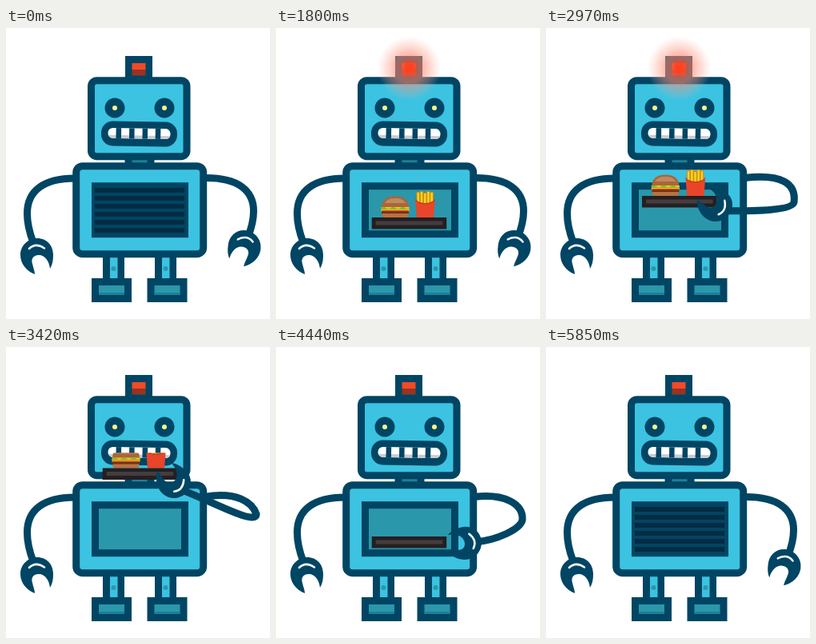
An HTML page for the animation above (7.2 s loop, 330x364 px).

```html
<!DOCTYPE html>
<html lang="en">
<head>
<meta charset="utf-8">
<title>Robot lunch</title>
<style>
  html, body { margin: 0; width: 100%; height: 100%; overflow: hidden; background: #fff; }
  svg { display: block; width: 330px; height: 364px; }
  .dark { fill: #004563; }
  .blue { fill: #3bc3e1; }
  .teal { fill: #2b97ab; }
  .shade { fill: #1f7f95; }
  .edge { stroke: #004563; stroke-width: 9; }
  .arm { fill: none; stroke: #004563; stroke-width: 9; stroke-linejoin: round; }
</style>
</head>
<body>
<svg viewBox="0 0 330 364">
  <defs>
    <radialGradient id="halo">
      <stop offset="0" stop-color="#fb4a28" stop-opacity=".9"/>
      <stop offset=".2" stop-color="#f8644a" stop-opacity=".72"/>
      <stop offset=".45" stop-color="#ff8a74" stop-opacity=".58"/>
      <stop offset=".72" stop-color="#ff9c88" stop-opacity=".32"/>
      <stop offset="1" stop-color="#ffb0a0" stop-opacity="0"/>
    </radialGradient>
    <filter id="soft" x="-50%" y="-50%" width="200%" height="200%"><feGaussianBlur stdDeviation="2"/></filter>
    <clipPath id="belowTeeth"><path d="M0 132.500H330V364H0Z"/></clipPath>
    <clipPath id="hatch"><path d="M111 200H223V256H111Z"/></clipPath>
    <clipPath id="mouthShape"><rect x="127.500" y="125.500" width="78" height="13" rx="6"/></clipPath>
    <g id="hand">
      <path class="dark" d="M3 24C14 20 21 10 21 0C21-13 10-21 0-21C-12-21-20-12-20 0C-20 7-19 12-16 17C-15 8-10 0-2 0C5 0 8 5 6 11C5 16 3 20 3 24Z"/>
      <path d="M10-8Q2-16-9-8.500" fill="none" stroke="#fff" stroke-width="2.500" stroke-linecap="round"/>
    </g>
    <g id="leg">
      <path class="dark" d="M121 284H148V318H121Z"/>
      <path class="blue" d="M130 287H139.500V313H130Z"/>
      <circle class="teal" cx="134.500" cy="301" r="3"/>
    </g>
    <g id="foot">
      <path class="dark" d="M107 313H157V343H107Z"/>
      <path class="teal" d="M116 322H148V334H116Z"/>
      <path class="shade" d="M116 331H148V334H116Z"/>
    </g>
    <g id="eye">
      <circle class="dark" r="12.500"/>
      <circle r="3" fill="#f8f58c"/>
    </g>
  </defs>

  <!-- legs and neck -->
  <use href="#leg"/><use href="#leg" x="65"/>
  <use href="#foot"/><use href="#foot" x="69.500"/>
  <path class="dark" d="M148.500 160H185.500V175H148.500Z"/>
  <path class="shade" d="M157.500 164H176.500V170H157.500Z"/>

  <!-- head -->
  <path class="dark" d="M149 35H183V64H149Z"/>
  <path fill="#f24a27" d="M157.500 44H174.500V52H157.500Z"/>
  <path fill="#983423" d="M157.500 52H174.500V59.500H157.500Z"/>
  <rect class="blue edge" x="106.500" y="65.700" width="119.500" height="95" rx="7"/>
  <use href="#eye" x="136" y="100"/><use href="#eye" x="198" y="100"/>
  <g transform="rotate(1 166.500 132.500)">
    <rect class="dark" x="119" y="117" width="95" height="31" rx="14.500"/>
    <g clip-path="url(#mouthShape)">
      <path fill="#fff" d="M127 125H206V139H127Z"/>
      <path fill="#c9cbd3" d="M127 134.500H206V139H127Z"/>
      <path class="edge" style="stroke-width:6.5" d="M140.800 125V140M157.300 125V140M173.800 125V140M190 125V140"/>
    </g>
  </g>
  <g id="lamp">
    <circle cx="166.500" cy="50.500" r="40" fill="url(#halo)"/>
    <path fill="#ff3f1c" filter="url(#soft)" d="M160 43H173.500V56.500H160Z"/>
  </g>

  <!-- body and window -->
  <rect class="blue edge" x="87.700" y="172.700" width="159" height="110" rx="8"/>
  <rect class="teal edge" x="111.500" y="197.700" width="112" height="60"/>

  <g clip-path="url(#belowTeeth)">
    <g id="food">
      <path fill="#a9663a" d="M132 224.500C132 215 138.500 210.500 149 210.500S166 215 166 224.500Z"/>
      <path fill="#c08a60" d="M136 219C139 214 143 213 149 213S159 214 162 219Z"/>
      <path fill="#f5c51e" d="M131.500 224H166.500V229H131.500Z"/>
      <path fill="#8ab62c" d="M131.500 225Q134.500 222.500 137.500 225T143.500 225T149.500 225T155.500 225T161.500 225T166.500 225V227H131.500Z"/>
      <path fill="#d8422a" d="M132.500 228H165.500V230H132.500Z"/>
      <path fill="#6d321c" d="M132 229.500H166V232.500H132Z"/>
      <path fill="#b87240" d="M132.500 232H165.500V234Q165.500 237 161.500 237H136.500Q132.500 237 132.500 234Z"/>
      <g id="sticks" fill="#fdd01c" stroke="#c98a14"></g>
      <path fill="#e8452a" d="M174 213.500C178 221 195 221 199 213.500L197 237H176Z"/>
      <path fill="none" stroke="#b8321e" d="M174.500 214.500C178 221.500 195 221.500 198.500 214.500"/>
    </g>
  </g>
  <g id="tray">
    <path fill="#241f21" d="M119.700 237H213.200V251.500H119.700Z"/>
    <path fill="#453c3f" d="M124.700 241.500H208.200V246.500H124.700Z"/>
  </g>
  <g clip-path="url(#hatch)">
    <g id="shutter"><path class="dark" d="M111 200H223V256H111Z"/></g>
  </g>

  <!-- arms -->
  <path class="arm" d="M86 188C48 188 26.500 203 26.500 232C26.500 245 29 255 34 268"/>
  <use href="#hand" transform="translate(39 284) scale(-1 1)"/>
  <path class="arm" id="arm"/>
  <use href="#hand" id="grip"/>
</svg>
<script>
const LOOP = 7200, STEP = 30;
const el = id => document.getElementById(id);
const clamp = v => Math.max(0, Math.min(1, v));
const span = (t, a, b) => clamp((t - a) / (b - a));

const linear = u => u;
const easeIn = u => u * u;
const easeOut = u => 1 - (1 - u) ** 2;
const smooth = u => u * u * (3 - 2 * u);

// Upper-arm controls, elbow, forearm controls, hand x, y, turn, tray lift
const rest  = [290, 187, 309.5, 203, 309.5, 229, 309.5, 240, 307, 250, 297.5, 274, 8, 0];
const reach = [285, 184, 309, 196, 308, 218, 307, 230, 285, 243, 252, 257, 72, 0];
const leave = [285, 183, 309, 196, 308, 216, 306, 228, 275, 242, 236, 245, 72, 0];
const hold  = [285, 183, 309, 196, 309, 218, 305, 230, 262, 240, 213, 247, 90, 0];
const lift  = [295, 182, 313, 195, 310, 218, 307, 228, 265, 229, 212, 221, 112, 27];
const serve = [289, 180, 308, 195, 313, 209, 312, 224, 260, 194, 210, 168, 128, 85.5];

// Each key: time, pose, easing on the way to it
const keys = [
  [0, rest, linear], [1800, rest, linear], [2250, reach, linear], [2700, hold, linear],
  [2970, lift, easeIn], [3420, serve, easeOut], [4020, serve, linear], [4350, hold, smooth],
  [4440, leave, linear], [4770, reach, linear], [5460, rest, linear], [LOOP, rest, linear]
];

function poseAt(t) {
  const i = keys.findIndex(k => k[0] > t);
  const [start, from] = keys[i - 1], [end, to, ease] = keys[i];
  const u = ease(span(t, start, end));
  return from.map((v, n) => v + (to[n] - v) * u);
}

function drawArm(p) {
  const [x, y, turn] = p.slice(10);
  const a = turn * Math.PI / 180, c = Math.cos(a), s = Math.sin(a);
  const wrist = [x + 3 * c + 13 * s, y + 3 * s - 13 * c];
  el("arm").setAttribute("d", `M248 187.5C${p.slice(0, 6)}C${p.slice(6, 10)},${wrist}`);
  el("grip").setAttribute("transform", `translate(${x} ${y}) rotate(${turn})`);
}

function draw(now) {
  const t = Math.floor(now % LOOP / STEP) * STEP;
  const pose = poseAt(t), up = pose[13];
  drawArm(pose);
  el("tray").setAttribute("transform", `translate(${up / 85} ${-up})`);

  const eaten = 22 * span(t, 3420, 3690);
  el("food").setAttribute("transform", `translate(${up / 85} ${-up - eaten})`);
  el("food").style.display = t < 3690 ? "" : "none";

  el("lamp").style.opacity = span(t, 420, 480) - span(t, 3060, 3120);
  const open = span(t, 720, 810) - span(t, 5790, 5850);
  el("shutter").setAttribute("transform", `translate(0 ${-57 * open})`);
  requestAnimationFrame(draw);
}

function addRect(parent, x, y, width, height, fill) {
  const r = document.createElementNS("http://www.w3.org/2000/svg", "rect");
  Object.entries({ x, y, width, height }).forEach(([k, v]) => r.setAttribute(k, v));
  if (fill) r.setAttribute("fill", fill);
  el(parent).append(r);
}
for (let i = 0; i < 6; i++) addRect("shutter", 111, 200 + 10 * i, 112, 6, "#022c42");
[205.5, 204.5, 206.5, 204.5, 205.5].forEach((y, i) => addRect("sticks", 176 + 4.2 * i, y, 3.6, 18));

requestAnimationFrame(draw);
</script>
</body>
</html>
```
